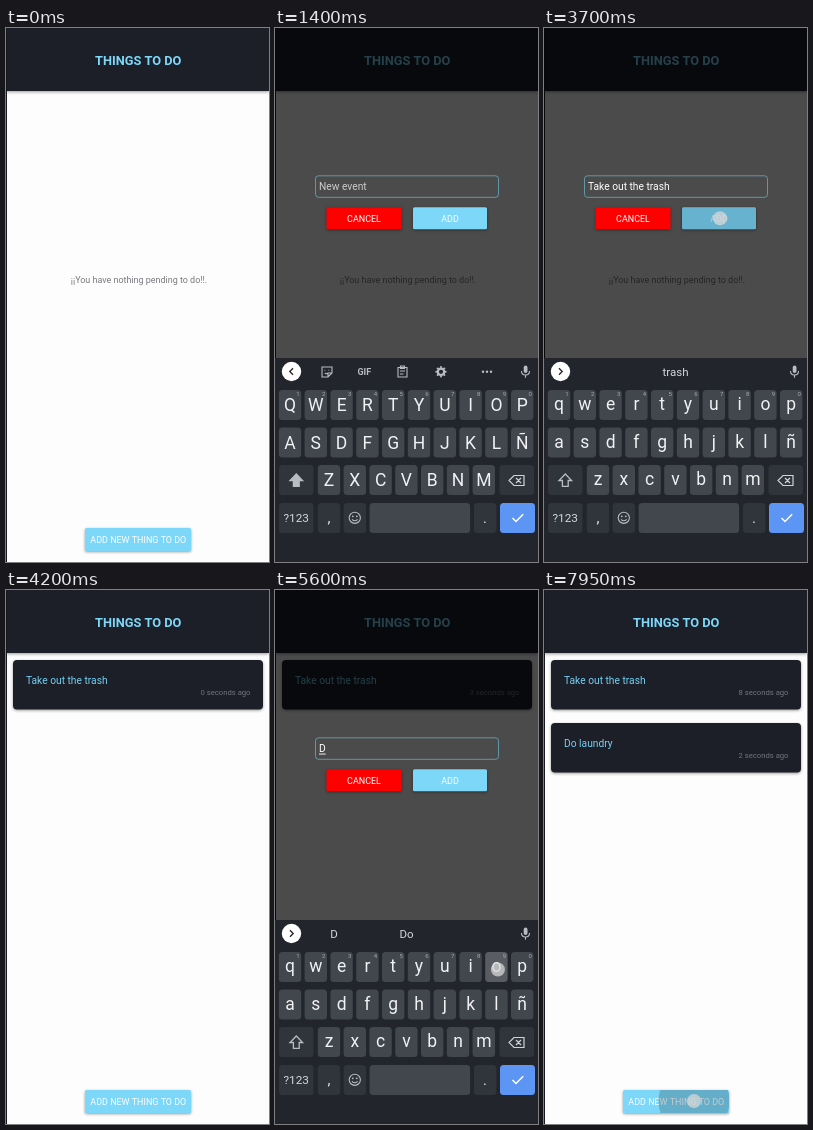
An HTML page with a canvas for the animation above (8 s loop, 263 by 534 pixels).

```html
<!DOCTYPE html>
<html lang="en">
<head>
<meta charset="utf-8">
<title>Things to do</title>
<style>
html, body { margin: 0; width: 263px; height: 534px; overflow: hidden; background: #fdfdfd; }
canvas { display: block; width: 263px; height: 534px; }
</style>
</head>
<body>
<canvas id="stage"></canvas>
<script>
const LOOP = 8000, W = 263, H = 534;
const SKY = '#7cd7f8', CARD = '#1c1f28', KEY = '#42464d', DARK_KEY = '#30343b', ICON = '#b9bcc1';
const canvas = document.getElementById('stage');
const c = canvas.getContext('2d');
const dpr = window.devicePixelRatio || 1;
canvas.width = W * dpr;
canvas.height = H * dpr;

// Each session: open the dialog, type the text, add it.
const sessions = [
  { text: 'Take out the trash', tap: 720, open: 900, keys: 1050, type: 1550, step: 104.5, add: 3680, close: 3880, born: 4100 },
  { text: 'Do laundry', tap: 4520, open: 4660, keys: 4930, type: 5500, step: 122, add: 6760, close: 6900, born: 6950 }
];
const buttonTaps = [...sessions.map(s => s.tap), 7890];
const SECOND = 475;

const rows = [
  { y: 362, x: 15, keys: 'qwertyuiop' },
  { y: 399.5, x: 15, keys: 'asdfghjklñ' },
  { y: 437, x: 54, keys: 'zxcvbnm' }
];
const PITCH = 25.8;

const clamp = v => Math.max(0, Math.min(1, v));
const ramp = (t, start, length) => clamp((t - start) / length);
const ease = p => 1 - (1 - p) ** 3;

function box(x, y, w, h, r, fill) {
  c.beginPath();
  c.roundRect(x, y, w, h, r);
  c.fillStyle = fill;
  c.fill();
}

function raised(x, y, w, h, r, fill) {
  c.save();
  c.shadowColor = 'rgba(0,0,0,.4)';
  c.shadowBlur = 3 * dpr;
  c.shadowOffsetY = dpr;
  box(x, y, w, h, r, fill);
  c.restore();
}

function label(str, x, y, size, fill, align = 'center', weight = 400) {
  c.font = `${weight} ${size}px Roboto, sans-serif`;
  c.textAlign = align;
  c.fillStyle = fill;
  c.fillText(str, x, y);
}

function disc(x, y, r, fill) {
  c.beginPath();
  c.arc(x, y, r, 0, 7);
  c.fillStyle = fill;
  c.fill();
}

function line(path, color = ICON, width = 1.1, fill) {
  const p = new Path2D(path);
  c.lineWidth = width;
  c.strokeStyle = color;
  if (fill) { c.fillStyle = fill; c.fill(p); }
  c.stroke(p);
}

function touch(x, y, alpha) {
  if (alpha > 0) disc(x, y, 7, `rgba(215,215,215,${alpha * 0.75})`);
}

// Finger dot: down for a while, then fading out.
const pressure = (t, down, hold, fade) => t < down ? 0 : 1 - ramp(t, down + hold, fade);

function card(text, y, seconds) {
  raised(7, y, 250, 49.5, 4, CARD);
  label(text, 20, y + 23.7, 10.24, '#75d0f2', 'left');
  label(`${Math.max(0, seconds)} seconds ago`, 244.5, y + 35, 7.68, '#71747b', 'right');
}

function addButton(t) {
  raised(79, 500, 106, 23, 1.5, SKY);
  label('ADD NEW THING TO DO', 132.3, 514.9, 8.96, '#fff');
  for (const tap of buttonTaps) {
    if (t < tap || t > tap + 350) continue;
    const fade = 1 - ramp(t, tap + 150, 200);
    c.save();
    c.beginPath();
    c.roundRect(79, 500, 106, 23, 1.5);
    c.clip();
    disc(150, 511, 10 + 85 * ramp(t, tap, 200), `rgba(40,70,85,${0.28 * fade})`);
    c.restore();
    touch(150, 511, pressure(t, tap, 120, 120));
  }
}

function list(t) {
  box(0, 0, W, H, 0, '#fdfdfd');
  const items = sessions.filter(s => t >= s.close);
  if (!items.length) label('¡¡You have nothing pending to do!!.', 133, 254.8, 8.96, '#77797c');
  items.forEach((s, i) => card(s.text, 70 + 63 * i, Math.floor((t - s.born) / SECOND)));
  addButton(t);
  raised(0, 0, W, 63, 0, CARD);
  label('THINGS TO DO', 132.2, 36.5, 12.8, SKY, 'center', 700);
  box(0, 0, 1, H, 0, '#16181f');
}

function dialog(t, s, typed, rise) {
  const y = 250 - 102.7 * rise;
  c.beginPath();
  c.roundRect(40.5, y + 0.5, 183, 21.5, 3);
  c.lineWidth = 1;
  c.strokeStyle = '#6198a7';
  c.stroke();
  label(typed || 'New event', 44, y + 15, 10.24, typed ? '#fff' : '#cdcdcd', 'left');
  const start = typed.lastIndexOf(' ') + 1;
  if (start < typed.length && t < s.add) {
    const from = 44 + c.measureText(typed.slice(0, start)).width;
    box(from, y + 16.3, 44 + c.measureText(typed).width - from, 0.9, 0, '#fff');
  }
  raised(51.5, y + 32, 75, 22, 1.5, '#fe0000');
  label('CANCEL', 89, y + 46.2, 8.96, '#fff');
  raised(138, y + 32, 74, 22, 1.5, SKY);
  label('ADD', 175, y + 46.2, 8.96, '#fff');
  const press = pressure(t, s.add, 100, 100);
  if (press > 0) {
    box(138, y + 32, 74, 22, 1.5, `rgba(40,70,85,${0.25 * press})`);
    touch(176, y + 43, press);
  }
}

function suggestions(s, typed) {
  const start = typed.lastIndexOf(' ') + 1;
  const part = typed.slice(start);
  const full = s.text.slice(start).split(' ')[0];
  if (!part) return ['the', 'and', 'to'];
  if (part === 'the') return ['the', 'they', 'te'];
  return part === full ? ['', full, ''] : [part, full, ''];
}

function strip(s, typed) {
  disc(16.5, 343.5, 9.7, '#fff');
  line(typed ? 'M15 340.3l3.2 3.2-3.2 3.2' : 'M18 340.3l-3.2 3.2 3.2 3.2', '#222', 1.3);
  if (typed) {
    suggestions(s, typed).forEach((w, i) => label(w, 59 + 72.5 * i, 347.7, 11.5, '#d5d8dc'));
  } else {
    line('M47 339h10v6l-4 4h-6zM57 345h-4v4M49.5 342.2h.8M53.5 342.2h.8M49.8 345q1.8 1.4 3.2 0');
    label('GIF', 89.3, 346.8, 9, ICON, 'center', 700);
    line('M123 339.5h9v9.5h-9zM125.5 338h4v2.5h-4zM125 343h5M125 346h3.5');
    c.beginPath();
    c.arc(166, 343.8, 3.2, 0, 7);
    c.lineWidth = 2.2;
    c.strokeStyle = ICON;
    c.stroke();
    for (let i = 0; i < 8; i++) {
      const a = i * Math.PI / 4;
      disc(166 + 4.7 * Math.cos(a), 343.8 + 4.7 * Math.sin(a), 1, ICON);
    }
    for (const x of [208, 212, 216]) disc(x, 343.8, 1.2, ICON);
  }
  box(248.7, 337.5, 3.8, 7.5, 1.9, ICON);
  line('M246.5 343q0 4 4 4t4-4M250.5 347v2.8');
}

function keyboard(s, typed, presses) {
  const caps = !typed;
  const key = (name, x, y, w, fill) => {
    box(x, y, w, 30, 3.5, fill);
    const p = presses[name];
    if (p) box(x, y, w, 30, 3.5, `rgba(255,255,255,${0.12 * p})`);
  };
  box(0, 330, W, 204, 0, '#22262c');
  strip(s, typed);
  rows.forEach((row, r) => [...row.keys].forEach((k, i) => {
    const x = row.x + PITCH * i;
    key(k, x - 11.2, row.y, 22.4, KEY);
    label(caps ? k.toUpperCase() : k, x, row.y + (caps ? 21.3 : 20.3), 17.5, '#f0f1f2');
    if (!r) label((i + 1) % 10, x + 8, 368, 6, '#a9acb1');
  }));

  key('shift', 4, 437, 34.5, DARK_KEY);
  line('M21.3 446l6.3 6.5h-3.4v5.8h-5.8v-5.8H15z', ICON, 1.3, caps ? ICON : null);
  key('back', 224.5, 437, 34.5, DARK_KEY);
  line('M239 447.5h10v10h-10l-5-5zM241 450l5 5M246 450l-5 5', '#d0d2d6', 1.2);

  key('num', 4, 475, 34.5, DARK_KEY);
  label('?123', 21.2, 494, 11.8, '#d5d8dc');
  key(',', 42.8, 475, 22.4, DARK_KEY);
  label(',', 54, 494.5, 15, '#e4e6e8');
  key('emoji', 68.6, 475, 22.4, DARK_KEY);
  c.beginPath();
  c.arc(79.8, 489.8, 5.6, 0, 7);
  c.lineWidth = 1.1;
  c.strokeStyle = ICON;
  c.stroke();
  disc(77.8, 488.3, 0.9, ICON);
  disc(81.8, 488.3, 0.9, ICON);
  line('M77 491.3q2.8 3 5.6 0');
  key(' ', 94.6, 475, 100.5, KEY);
  key('.', 199, 475, 22.4, DARK_KEY);
  label('.', 210, 494.5, 15, '#e4e6e8');
  key('enter', 225, 475, 35, '#5d95f4');
  line('M237.5 490l3.5 3.5 7.2-7.2', '#fff', 1.5);

  for (const name in presses) {
    const [x, y] = keySpot(name);
    touch(x, y, presses[name]);
  }
}

function keySpot(name) {
  for (const row of rows) {
    const i = row.keys.indexOf(name);
    if (i >= 0) return [row.x + PITCH * i + 1.5, row.y + 17.5];
  }
  return [155.5, 498];
}

function session(t, s) {
  const shown = ramp(t, s.open, 130) * (1 - ramp(t, s.close, 140));
  const rise = ease(ramp(t, s.keys, 190)) * (1 - ramp(t, s.close + 20, 180) ** 2);
  const count = t < s.type ? 0 : Math.floor((t - s.type) / s.step) + 1;
  const typed = s.text.slice(0, count);
  const presses = {};
  [...s.text.toLowerCase()].forEach((k, i) => {
    const p = pressure(t, s.type + i * s.step - 60, 60, 100);
    if (p > 0) presses[k] = Math.max(p, presses[k] || 0);
  });
  if (shown > 0) {
    c.save();
    c.globalAlpha = shown;
    box(0, 0, W, H, 0, 'rgba(0,0,0,.7)');
    dialog(t, s, typed, rise);
    c.restore();
  }
  if (rise > 0) {
    c.save();
    c.translate(0, 204 * (1 - rise));
    keyboard(s, typed, presses);
    c.restore();
  }
}

function draw(now) {
  const t = now % LOOP;
  c.setTransform(dpr, 0, 0, dpr, 0, 0);
  list(t);
  for (const s of sessions) if (t >= s.open && t < s.close + 250) session(t, s);
}

let origin;
function frame(now) {
  origin ??= now;
  draw(now - origin);
  requestAnimationFrame(frame);
}
draw(0);
requestAnimationFrame(frame);
</script>
</body>
</html>
```
